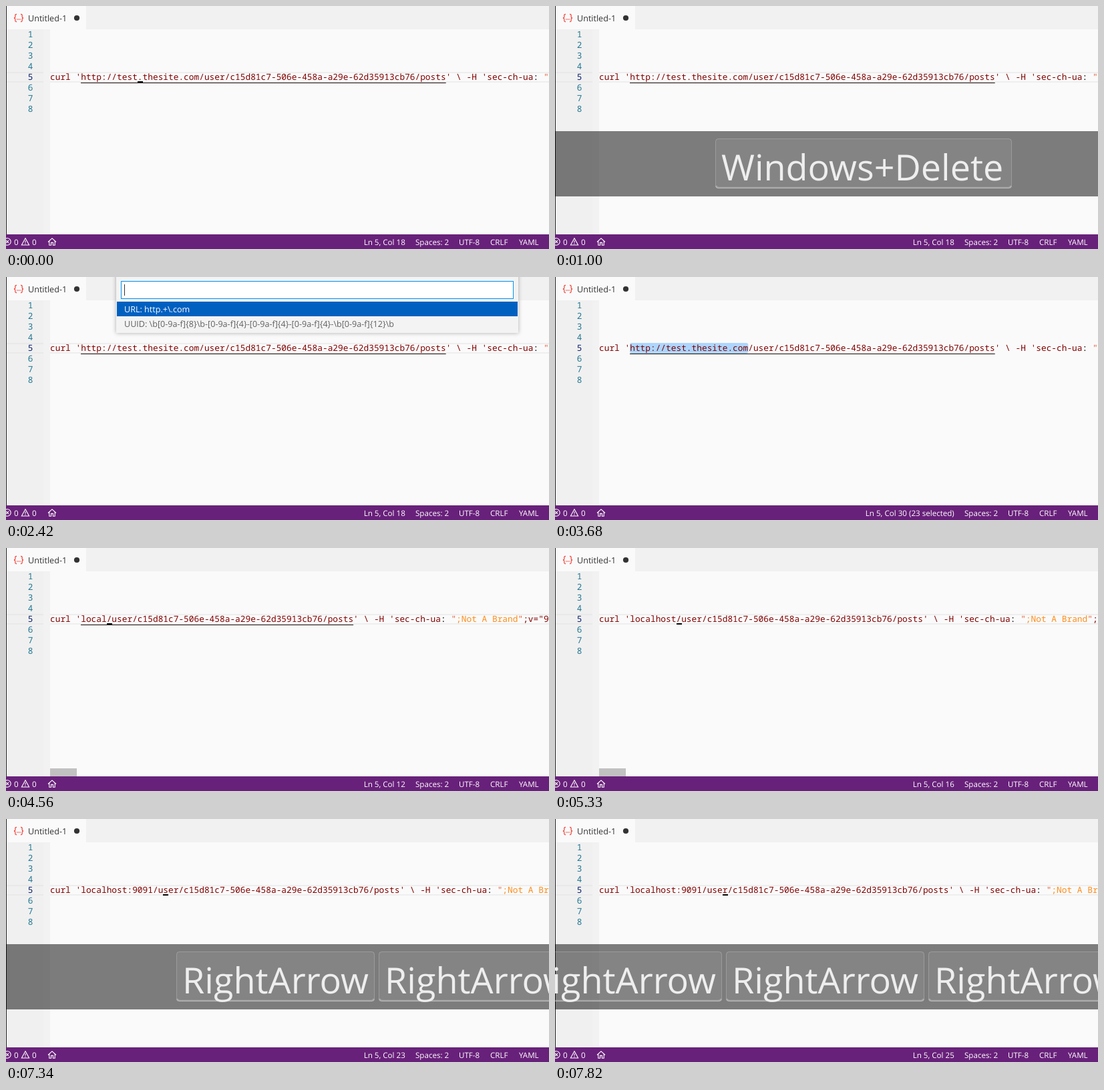
An HTML page for the animation above (8000 ms loop, 813 px wide and 365 px high).

```html
<!DOCTYPE html>
<html lang="en">
<head>
<meta charset="utf-8">
<title>Editor selection demo</title>
<style>
  html, body { margin: 0; width: 100%; height: 100%; overflow: hidden; background: #fafafa; }
  svg { display: block; width: 100vw; height: 100vh; }
  text { white-space: pre; text-rendering: geometricPrecision; }
  .code { font: 12.833px "Noto Sans Mono", monospace; fill: #800000; }
  .ui { font: 12.58px "Open Sans", sans-serif; }
  .status { font: 11.6px "Open Sans", sans-serif; fill: #fff; }
  .key { font: 53.9px "Open Sans", sans-serif; fill: #eee; }
  .icon { fill: none; stroke: #fff; stroke-width: 1.1; }
</style>
</head>
<body>
<svg viewBox="0 0 813 365" preserveAspectRatio="none">
  <defs>
    <filter id="shadow" x="-5%" y="-20%" width="110%" height="150%">
      <feDropShadow dx="0" dy="0" stdDeviation="3" flood-color="#000" flood-opacity=".32"/>
    </filter>
  </defs>

  <rect width="813" height="365" fill="#fafafa"/>
  <rect width="813" height="35" fill="#f1f1f1"/>
  <rect width="120" height="35" fill="#fafafa"/>
  <rect y="35" width="56" height="308" fill="#f0f0f0"/>
  <rect x="56" y="35" width="10" height="308" fill="#f2f2f2"/>

  <!-- tab -->
  <g fill="none" stroke="#f0524a" stroke-width="1.3">
    <path d="M16 12.5h-.8q-1.4 0-1.4 1.5v2.2q0 1.5-1.8 1.8 1.8.3 1.8 1.8V22q0 1.5 1.4 1.5h.8"/>
    <path d="M22 12.5h.8q1.4 0 1.4 1.5v2.2q0 1.5 1.8 1.8-1.8.3-1.8 1.8V22q0 1.5-1.4 1.5H22"/>
    <path d="M16.2 20h1.2m1 0h1.2m1 0h1.2"/>
  </g>
  <text class="ui" x="33" y="23" fill="#333">Untitled-1</text>
  <circle cx="106" cy="18" r="4.1" fill="#333"/>

  <!-- editor -->
  <g id="lineMark">
    <path d="M1 100h55m-55 14h55" stroke="#e9e9e9" stroke-width="2"/>
    <path d="M66 100h747m-747 14h747" stroke="#eee" stroke-width="2"/>
  </g>
  <rect id="selection" x="112" y="99" width="177.3" height="16" rx="3" fill="#add6ff"/>
  <g id="numbers" class="code" text-anchor="end"></g>
  <text class="code" x="66" y="111"><tspan id="command"></tspan><tspan fill="#000">:</tspan> <tspan fill="#e2603a">"</tspan><tspan fill="#ff8c1a">;Not A Brand</tspan><tspan fill="#e2603a">"</tspan>;v="99", "</text>
  <rect id="link" x="112" y="115" height="1" fill="#1c0a0a"/>
  <rect id="caret" y="113" width="8" height="2" fill="#000"/>
  <rect id="scroll" x="66" y="331" width="40" height="12" fill="#c1c1c1"/>
  <rect width="1" height="343" fill="#222"/>

  <!-- picker -->
  <g id="picker">
    <rect x="165" y="-8" width="602" height="92" fill="#f3f3f3" filter="url(#shadow)"/>
    <rect x="172.5" y="6.5" width="587" height="26" fill="#fff" stroke="#0090f1"/>
    <rect id="pickCaret" x="177" y="11" width="1" height="17" fill="#333"/>
    <rect id="pickRow" x="166" width="600" height="22" fill="#0060c0"/>
    <g id="rows" class="ui">
      <text x="177" y="53">URL: http.+\.com</text>
      <text x="177" y="75">UUID: \b[0-9a-f]{8}\b-[0-9a-f]{4}-[0-9a-f]{4}-[0-9a-f]{4}-\b[0-9a-f]{12}\b</text>
    </g>
  </g>

  <!-- key display -->
  <g id="band">
    <rect y="188" width="813" height="98" fill="#000" fill-opacity=".5"/>
    <g id="keys"></g>
  </g>

  <!-- status bar -->
  <rect y="343" width="813" height="22" fill="#68217a"/>
  <g class="icon">
    <circle cx="2" cy="354" r="5.2"/>
    <path d="M0 352l4 4m0-4l-4 4"/>
    <path d="M29 348.8l5.6 10.2H23.4z M29 352.2v3.3m0 1.1v1.2"/>
    <path d="M63 354.5l6-5.6 6 5.6 M64.8 353.2v6h2.8v-3.8h2.8v3.8h2.8v-6"/>
  </g>
  <g class="status">
    <text x="12" y="359">0</text>
    <text x="39" y="359">0</text>
    <text id="position" x="597.8" y="359" text-anchor="end"></text>
    <text x="613" y="359">Spaces: 2</text>
    <text x="678" y="359">UTF-8</text>
    <text x="725" y="359">CRLF</text>
    <text x="768" y="359">YAML</text>
  </g>
</svg>
<script>
const LOOP = 8000, CHAR = 7.7, LEFT = 66;
const PATH = "/user/c15d81c7-506e-458a-a29e-62d35913cb76/posts";
const $ = id => document.getElementById(id);
const typed = (t, host, more) => [t, { host, caret: 6 + host.length, caretOn: true, ...more }];
const arrows = (t, caret, count, left) =>
  [t, { caret, caretOn: true, keys: Array(count).fill("RightArrow"), left }];

const start = {
  host: "http://test.thesite.com", caret: 17, caretOn: true, selected: false,
  link: true, scroll: false, pick: -1, pickCaret: true, keys: [], left: 0
};

// Each step keeps everything it does not mention.
const steps = [
  [0, {}],
  [250, { caretOn: false }],
  [750, { caretOn: true }],
  [1000, { caretOn: false, keys: ["Windows+Delete"], left: 240 }],
  [1120, { pick: 0 }],
  [1510, { pickCaret: false }],
  [1770, { pick: 1, keys: [] }],
  [2040, { pickCaret: true }],
  [2420, { pick: 0 }],
  [2540, { pickCaret: false }],
  [3060, { pickCaret: true }],
  [3180, { pick: -1, selected: true, caret: 29, caretOn: true }],
  [3680, { caretOn: false }],
  typed(4070, "l", { selected: false }),
  typed(4190, "lo"),
  typed(4310, "loc"),
  typed(4560, "local", { scroll: true }),
  typed(4710, "localh"),
  typed(4960, "localho", { link: false }),
  typed(5330, "localhost"),
  typed(5700, "localhost:"),
  typed(5950, "localhost:9"),
  typed(6070, "localhost:90"),
  typed(6320, "localhost:9091"),
  [6810, { caretOn: false }],
  [7190, { scroll: false }],
  arrows(7190, 21, 1, 313),
  arrows(7340, 22, 2, 255),
  arrows(7460, 22, 2, 162),
  arrows(7580, 23, 3, 104),
  arrows(7820, 24, 4, -47)
];

let state = start;
const timeline = steps.map(([t, change]) => ({ t, state: state = { ...state, ...change } }));

for (let n = 1; n <= 8; n++) {
  $("numbers").innerHTML +=
    `<text x="40.5" y="${31 + 16 * n}" fill="${n === 5 ? "#0b216f" : "#237893"}">${n}</text>`;
}

const show = (id, on) => { $(id).style.display = on ? "" : "none"; };

function keyBox(label, x) {
  const w = label === "RightArrow" ? 297 : 444;
  return `<rect x="${x + .5}" y="199.5" width="${w - 1}" height="74" rx="4"
      fill="#fff" fill-opacity=".06" stroke="#fff" stroke-opacity=".22"/>
    <path d="M${x + 1} 270q1 3 4 3h${w - 10}q3 0 4-3" fill="none"
      stroke="#fff" stroke-opacity=".25" stroke-width="2.5"/>
    <text class="key" x="${x + 9}" y="262">${label}</text>`;
}

function draw(s) {
  const url = s.host + PATH;
  $("command").textContent = `curl '${url}' \\ -H 'sec-ch-ua`;
  $("link").setAttribute("width", url.length * CHAR);
  $("caret").setAttribute("x", Math.round(LEFT + s.caret * CHAR));
  $("position").textContent = `Ln 5, Col ${s.caret + 1}${s.selected ? " (23 selected)" : ""}`;
  show("link", s.link);
  show("caret", s.caretOn && s.pick < 0);
  show("selection", s.selected);
  show("lineMark", !s.selected);
  show("scroll", s.scroll);

  show("picker", s.pick >= 0);
  show("pickCaret", s.pickCaret);
  $("pickRow").setAttribute("y", 37 + 22 * Math.max(s.pick, 0));
  [...$("rows").children].forEach((row, i) =>
    row.setAttribute("fill", i === s.pick ? "#fff" : "#616161"));

  show("band", s.keys.length > 0);
  $("keys").innerHTML = s.keys.map((key, i) => keyBox(key, s.left + 303 * i)).join("");
}

const origin = performance.now();
let shown;
function frame() {
  const t = (performance.now() - origin) % LOOP;
  const step = timeline.findLast(item => item.t <= t);
  if (step !== shown) draw((shown = step).state);
  requestAnimationFrame(frame);
}
frame();
</script>
</body>
</html>
```
